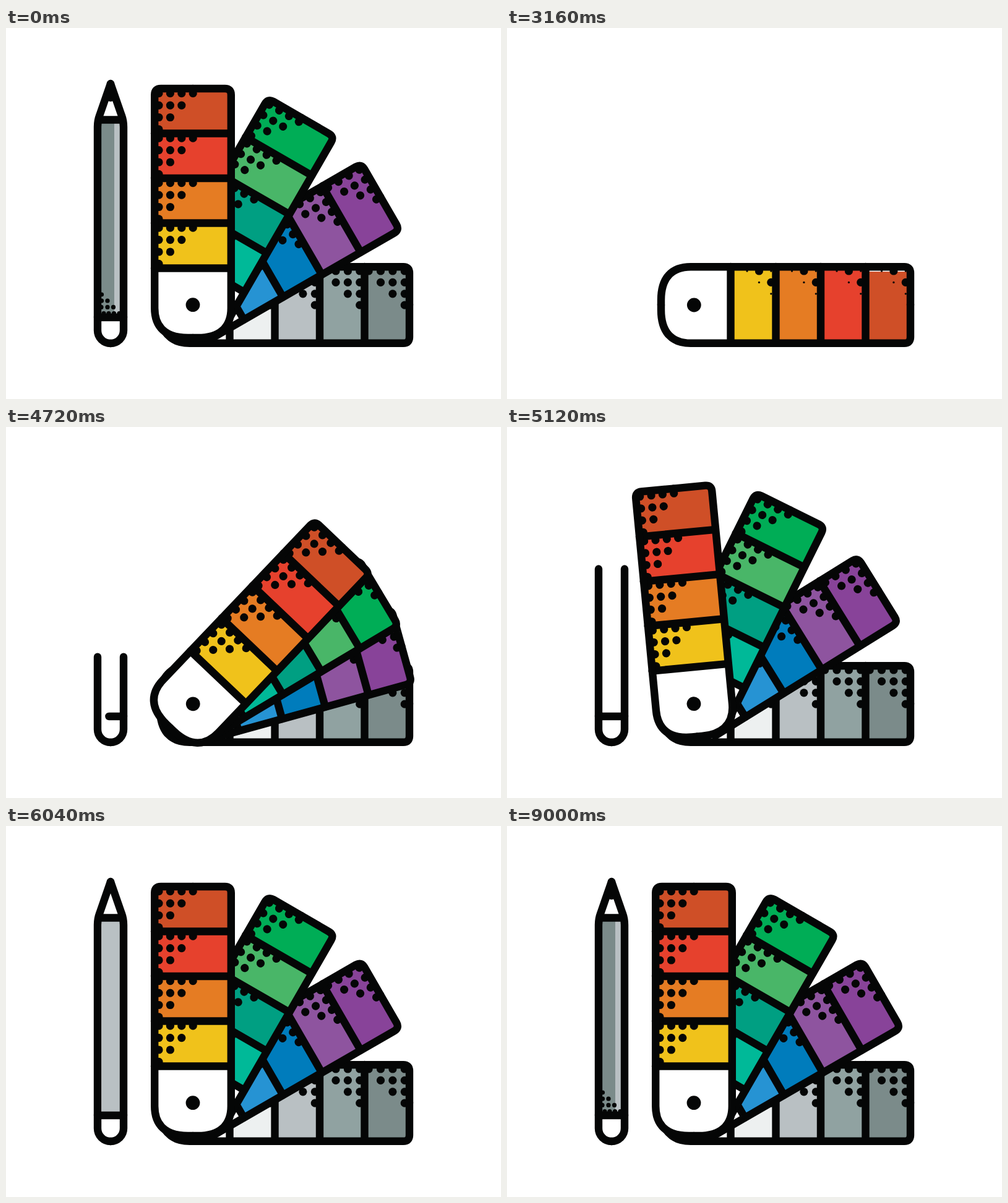
Recreate the animation shown at these times as an HTML page. Size 800 px wide and 600 px high, loop 9040 ms.

```html
<!DOCTYPE html>
<html lang="en">
<head>
<meta charset="utf-8">
<title>Colour swatches</title>
<style>
  html, body { margin: 0; width: 100%; height: 100%; overflow: hidden; background: #fff; }
  svg { display: block; width: 100vw; height: 100vh; }
  .line { fill: none; stroke: #050606; stroke-width: 12.4; stroke-linecap: round; stroke-linejoin: round; }
</style>
</head>
<body>
<svg id="stage" viewBox="0 0 800 600"></svg>
<script>
const LOOP = 9040, STEP = 40, INK = '#050606';
const PIVOT = { x: 302, y: 448 };
const EDGES = [361.5, 434.5, 507, 579.5, 652];
const stage = document.getElementById('stage');

const clamp = u => Math.max(0, Math.min(1, u));
const span = (t, from, to) => clamp((t - from) / (to - from));
const mix = (a, b, u) => a + (b - a) * u;
const easeOut = u => 1 - (1 - u) ** 2;
const easeInOut = u => (1 - Math.cos(Math.PI * u)) / 2;

function add(parent, tag, attrs = {}) {
  const el = document.createElementNS('http://www.w3.org/2000/svg', tag);
  set(el, attrs);
  parent.appendChild(el);
  return el;
}
function set(el, attrs) {
  for (const key in attrs) el.setAttribute(key, attrs[key]);
}
function show(el, on) {
  el.style.display = on ? '' : 'none';
}
const addLine = (parent, d) => add(parent, 'path', { d, class: 'line', pathLength: 1 });
function trace(path, u) {
  show(path, u > 0);
  set(path, { 'stroke-dasharray': u < 1 ? `${u} 2` : 'none' });
}

// A card lies along the x axis and turns around its pin.
// The middle cards have no rounded foot.
function outlineHalf(side, hasFoot) {
  const y = d => 448 + side * d;
  const foot = hasFoot
    ? `M249 448V${y(-8)}C249 ${y(-44)} 266 ${y(-61.8)} 297 ${y(-61.8)}`
    : `M304 ${y(-61.8)}`;
  return `${foot}H642Q652 ${y(-61.8)} 652 ${y(-51.8)}V448`;
}

function makeCard(colors, { hasFoot = false, hasPin = false } = {}) {
  const g = add(stage, 'g');
  const halves = [1, -1].map(side => outlineHalf(side, hasFoot));
  halves.forEach(d => add(g, 'path', { d: d + (hasFoot ? 'Z' : 'H304Z'), fill: '#fff' }));
  const cells = colors.map((fill, i) =>
    add(g, 'rect', { x: EDGES[i], width: EDGES[i + 1] - EDGES[i], y: 388, height: 120, fill }));
  const dots = [];
  colors.forEach((_, cell) => {
    for (let row = 0; row < 4; row++)
      for (let col = 0; col < 4 - row; col++)
        dots.push({
          row, col,
          el: add(g, 'circle', {
            cx: EDGES[cell + 1] - 7.7 - row * 19.4, cy: 393 + col * 18.4, r: 6.6, fill: INK
          })
        });
  });
  const bars = EDGES.slice(0, 4).map(x => addLine(g, `M${x} 386V509.5`));
  const outline = halves.map(d => addLine(g, d));
  const pin = hasPin && add(g, 'circle', { cx: 302.3, cy: PIVOT.y, r: 11.4, fill: INK });
  return { g, cells, dots, bars, outline, pin };
}

const cards = [
  makeCard(['#edf0f0', '#b9c0c3', '#90a2a1', '#7b8b8a'], { hasFoot: true }),
  makeCard(['#2693d3', '#007cbc', '#8e549f', '#884399']),
  makeCard(['#00b998', '#009f82', '#49b668', '#00ad56']),
  makeCard(['#f0c21b', '#e57c23', '#e6412d', '#cf4f27'], { hasFoot: true, hasPin: true })
];
const topCard = cards[3];

const pencil = add(stage, 'g');
const light = add(pencil, 'rect', { y: 148, height: 320, fill: '#b9c0c3' });
const dark = add(pencil, 'rect', { x: 152, y: 148, height: 320, fill: '#7b8b8a' });
const grains = [];
[[154.5], [154.5, 164], [154, 164, 173.5], [158, 166, 174.5, 183]].forEach((row, i) =>
  row.forEach((x, j) => grains.push({
    x, i, j, el: add(pencil, 'circle', { cy: 431 + i * 10.2, fill: INK })
  })));
const lead = add(pencil, 'path', { d: 'M169 90L162 112A7 7 0 0 0 176 112Z', fill: INK });
const sides = [
  'M169 510A21 21 0 0 1 148 489V160Q148 150 151 142L169 90',
  'M169 510A21 21 0 0 0 190 489V160Q190 150 187 142L169 90'
].map(d => addLine(pencil, d));
const lowBar = addLine(pencil, 'M190 468H148');
const highBar = addLine(pencil, 'M153 148.5H185');

// Fan opening: gathers speed, swings past the end, then settles at 1.
function fan(t) {
  if (t < 4720) return 0.5156 * span(t, 3840, 4720) ** 2.53;
  if (t < 5180) {
    const u = span(t, 4720, 5180);
    return 0.5156 + 0.68 * u * (1 - u) ** 2 + 0.561 * u * u * (3 - 2 * u);
  }
  return mix(1.0766, 1, easeInOut(span(t, 5180, 5500)));
}

function drawTopCard(t) {
  topCard.outline.forEach(path => trace(path, span(t, 1630, 2910)));
  topCard.bars.forEach((bar, i) => trace(bar, span(t, 2790 + i * 30, 2930 + i * 30)));
  topCard.cells.forEach((cell, i) => {
    const h = 120 * easeOut(span(t, 2850 + i * 40, 3095 + i * 40));
    set(cell, { y: 508 - h, height: h });
  });
  topCard.dots.forEach(({ el, row, col }) => {
    const start = 3010 + Math.abs(col + row - 1) * 130;
    set(el, { r: 6.6 * easeOut(span(t, start, start + 150)) });
  });
  set(topCard.pin, { r: 11.4 * easeOut(span(t, 2800, 3000)) });
}

function drawPencil(t) {
  sides.forEach(path => trace(path, span(t, 4298, 5522)));
  trace(lowBar, span(t, 4630, 4790));
  trace(highBar, span(t, 5540, 5700));
  const lightWidth = 34 * easeOut(span(t, 5700, 6090));
  set(light, { x: 188 - lightWidth, width: lightWidth });
  set(dark, { width: 23 * easeOut(span(t, 6120, 6600)) });
  show(lead, t >= 6560);
  const drift = 1 - easeInOut(span(t, 7040, 7400));
  grains.forEach(({ el, x, i, j }) => {
    const start = 6960 - i * 100;
    const shift = [3.5, 1.2, j - 0.8, 0.5][i] * drift;
    set(el, { cx: x + shift, r: 3.6 * easeOut(span(t, start, start + 80)) });
  });
}

function render(time) {
  let t = Math.floor((time % LOOP) / STEP) * STEP;
  // The finished picture is held across the loop point, then cleared.
  if (t < 1520) t += LOOP;
  const open = fan(t);
  cards.forEach((card, i) => {
    show(card.g, card === topCard ? t >= 1630 : open > 0);
    set(card.g, { transform: `rotate(${-30 * i * open} ${PIVOT.x} ${PIVOT.y})` });
  });
  drawTopCard(t);
  drawPencil(t);
}

const begin = performance.now();
function tick() {
  render(performance.now() - begin);
  requestAnimationFrame(tick);
}
tick();
</script>
</body>
</html>
```
